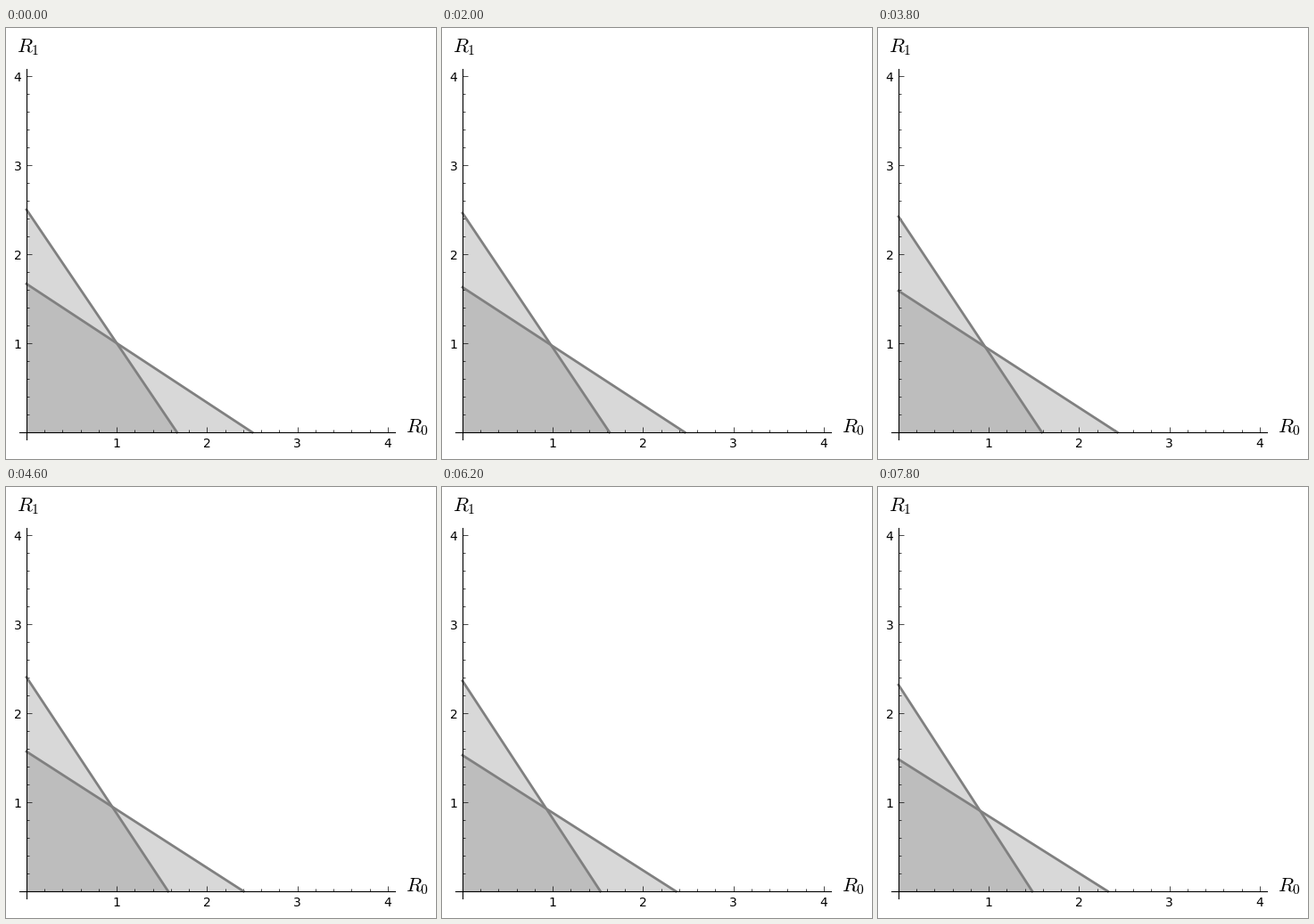
These frames come from a looping animation (482x484 px, 8 s). A matplotlib script:

```python
import matplotlib.pyplot as plt
from matplotlib.animation import FuncAnimation
from matplotlib.ticker import MultipleLocator

W, H, DPI = 482, 484, 100
FRAMES, STEP_MS = 40, 200
X0, Y0 = 23, 30          # axis crossing, in pixels from the lower left
UX, UY = 101.2, 100      # pixels per unit
LO, HI = -0.08, 4.08

plt.rcParams.update({
    "font.family": "DejaVu Sans",
    "font.size": 10,
    "mathtext.fontset": "cm",
})

fig = plt.figure(figsize=(W / DPI, H / DPI), dpi=DPI, facecolor="white")
ax = fig.add_axes([
    (X0 + LO * UX) / W, (Y0 + LO * UY) / H,
    (HI - LO) * UX / W, (HI - LO) * UY / H,
])
ax.set(xlim=(LO, HI), ylim=(LO, HI))
ax.patch.set_visible(False)

for side in ("left", "bottom"):
    ax.spines[side].set_position("zero")
    ax.spines[side].set_linewidth(0.8)
for side in ("right", "top"):
    ax.spines[side].set_visible(False)

for axis in (ax.xaxis, ax.yaxis):
    axis.set_major_locator(MultipleLocator(1))
    axis.set_minor_locator(MultipleLocator(0.2))
    axis.set_major_formatter(lambda v, _: f"{v:.0f}" if v > 0.5 else "")
ax.tick_params(which="major", direction="in", length=4, width=0.5, pad=4)
ax.tick_params(which="minor", direction="in", length=2, width=0.5)


def axis_name(x, y, text):
    fig.text(x / W, 1 - y / H, text, fontsize=16, ha="left", va="baseline")


axis_name(11.5, 27.5, "$R_1$")
axis_name(447.5, 454.5, "$R_0$")


def make_region():
    (area,) = ax.fill([0, 0, 0], [0, 0, 0], color="gray", alpha=0.3, lw=0, zorder=1)
    (edge,) = ax.plot([], [], color="gray", lw=2, solid_capstyle="projecting",
                      clip_on=False, zorder=2)
    return area, edge


regions = [make_region() for _ in range(2)]


def intercepts(i):
    """Long and short axis intercepts, shrinking a little faster with time."""
    drop = 0.0035 * i + 0.00003 * i * i
    return 5 / 2 - drop, 5 / 3 - 1.015 * drop


def draw(i):
    far, near = intercepts(i)
    for (area, edge), (a, b) in zip(regions, ((near, far), (far, near))):
        area.set_xy([(0, 0), (a, 0), (0, b)])
        edge.set_data([0, a], [b, 0])
    return [part for region in regions for part in region]


anim = FuncAnimation(fig, draw, frames=FRAMES, interval=STEP_MS,
                     repeat=True, repeat_delay=0, blit=False)
plt.show()
```
